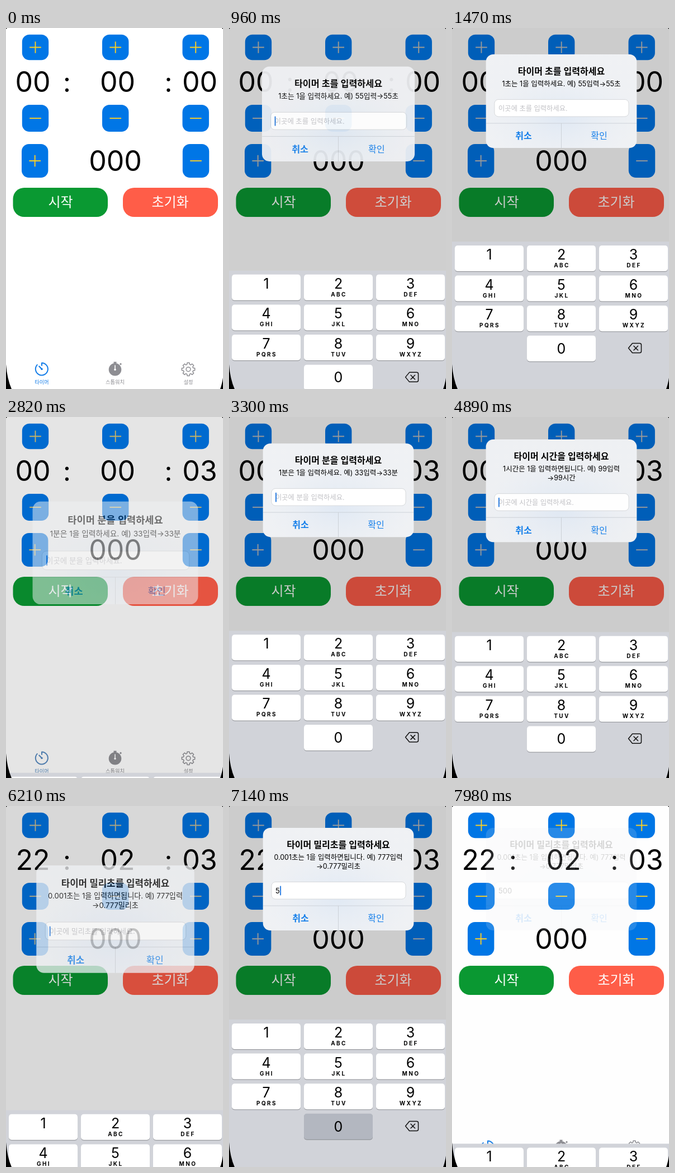
Write an HTML page that moves like this. It is 388 px wide and 644 px high and loops after 8000 ms.

```html
<!DOCTYPE html>
<html lang="ko">
<head>
<meta charset="utf-8">
<title>Timer</title>
<style>
html, body { margin: 0; width: 100%; height: 100%; overflow: hidden; background: #fff; }
svg { display: block; width: 388px; height: 644px; }
text { font-family: Inter, "Noto Sans CJK KR", "Noto Sans CJK", sans-serif; white-space: pre; }
.mid { text-anchor: middle; }
</style>
</head>
<body>
<svg id="stage" viewBox="0 0 388 644" xmlns="http://www.w3.org/2000/svg"></svg>
<script>
const LOOP = 8000, OMEGA = 18.26 / 1000;
const KEYBOARD_TOP = 381, KEYBOARD_TRAVEL = 263, KEYBOARD_DELAY = 78;
const FIRST_SEEN = 60, CLOSE_TIME = 420, ALERT_CENTER = 130.5, ALERT_SHIFT = 116;

const dialogs = [
  { open: 718, close: 2190, caretOff: 1470, unit: '초를', lines: ['1초는 1을 입력하세요. 예) 55입력→55초'],
    keys: [['3', 1680, 1800]] },
  { open: 2727, close: 3930, caretOff: 3360, unit: '분을', lines: ['1분은 1을 입력하세요. 예) 33입력→33분'],
    keys: [['2', 3510, 3630]] },
  { open: 4450, close: 5610, caretOff: LOOP, unit: '시간을', lines: ['1시간은 1을 입력하면됩니다. 예) 99입력', '→99시간'],
    keys: [['2', 4980, 5070], ['2', 5160, 5280]] },
  { open: 6060, close: 7800, caretOff: LOOP, unit: '밀리초를', lines: ['0.001초는 1을 입력하면됩니다. 예) 777입력', '→0.777밀리초'],
    keys: [['5', 6780, 6870], ['0', 7140, 7200], ['0', 7260, 7350]] }
];

const text = (x, y, size, str, attrs = '') =>
  `<text x="${x}" y="${y}" font-size="${size}" ${attrs}>${str}</text>`;
const label = (x, y, size, str, attrs = '') => text(x, y, size, str, `class="mid" ${attrs}`);
const rect = (x, y, w, h, r, fill, attrs = '') =>
  `<rect x="${x}" y="${y}" width="${w}" height="${h}" rx="${r}" fill="${fill}" ${attrs}/>`;
const mix = (a, b, p) => `rgb(${a.map((v, i) => Math.round(v + (b[i] - v) * p))})`;

// Remaining distance of a critically damped spring, 1 to 0
const rest = ms => ms <= 0 ? 1 : (1 + OMEGA * ms) * Math.exp(-OMEGA * ms);

function stepButton(cx, cy, h, plus) {
  const arm = plus ? `M${cx} ${cy - 10.3}v20.6` : '';
  return rect(cx - 23.7, cy - h / 2, 47.4, h, 13, '#0076e6', 'stroke="none"') +
    `<path d="M${cx - 10.3} ${cy}h20.6${arm}" stroke-width="1.9" fill="none"/>`;
}

function gear(cx, cy) {
  let d = '';
  for (let i = 0; i < 8; i++) {
    [[-0.27, 9], [-0.17, 11.8], [0.17, 11.8], [0.27, 9]].forEach(([off, r]) => {
      const a = i * Math.PI / 4 + off;
      d += `${d ? 'L' : 'M'}${(cx + r * Math.sin(a)).toFixed(2)} ${(cy - r * Math.cos(a)).toFixed(2)}`;
    });
  }
  return `<g fill="none" stroke="#8e8e93" stroke-width="1.5" stroke-linejoin="round">
    <path d="${d}Z"/><circle cx="${cx}" cy="${cy}" r="3.9"/></g>`;
}

function screen() {
  const cols = [52.5, 195.7, 339.2];
  return `<g id="steps">
    ${cols.map(x => stepButton(x, 34.5, 45.5, true) + stepButton(x, 161, 48, false)).join('')}
    ${stepButton(51.7, 237, 60, true)}${stepButton(339.5, 237, 60, false)}</g>
    ${[48, 199.5, 346.5].map((x, i) => label(x, 113.7, 50, '00', `id="num${i}"`)).join('')}
    ${label(109, 113.7, 48, ':')}${label(290.5, 113.7, 48, ':')}
    ${label(195.5, 254.6, 50, '000')}
    ${rect(12.5, 285, 169.5, 52, 20, '#0a9932')}${rect(209, 285, 170, 52, 20, '#ff5d48')}
    ${label(97.5, 319.3, 24, '시작', 'fill="#fff" font-weight="300"')}
    ${label(293.5, 319.3, 24, '초기화', 'fill="#fff" font-weight="300"')}`;
}

function tabs() {
  return `<g id="tab"><path d="M64 602v-4.6a11 11 0 1 1 -8.2 3.5M64 608.5l-4.8-5" fill="none"
      stroke="currentColor" stroke-width="2" stroke-linecap="round" stroke-linejoin="round"/>
      <circle cx="64" cy="608.5" r="1.8" fill="currentColor"/>
      ${label(64, 634.5, 9, '타이머', 'fill="currentColor" font-weight="500"')}</g>
    <g fill="#8e8e93"><circle cx="195" cy="609.3" r="11.3"/>
      <path d="M192.5 595.5h5v3h-5zM203 599.5l2-1.9 2 2-2 2z"/>
      <path d="M195 602v7" stroke="#fff" stroke-width="1.6" stroke-linecap="round"/>
      <circle cx="195" cy="609.5" r="1.8" fill="#fff"/>
      ${label(195, 634.5, 9.2, '스톱워치')}${label(326, 634.5, 9.2, '설정')}</g>
    ${gear(326, 608.8)}`;
}

function alertBox(dialog, i) {
  const d = dialog.lines.length > 1 ? 8 : 0;
  const y = 47 - d, h = 167 + 2 * d, bar = 170 + d;
  const box = fill => rect(60.7, y, 269.6, h, 13, fill);
  return `<g id="alert${i}" display="none">
    ${box('#f1f2f4')}${box('url(#glow)')}
    ${label(195.5, 83 - d, 16, `타이머 ${dialog.unit} 입력하세요`, 'font-weight="600"')}
    ${dialog.lines.map((s, n) => label(195.5, 103.5 - d + n * 16, 12.5, s)).join('')}
    ${rect(76, 127.5 + d, 240, 30.5, 7, '#fff', 'stroke="#cfd1d4" stroke-width="0.8"')}
    ${text(83, 147.5 + d, 12.3, `이곳에 ${dialog.unit} 입력하세요.`, 'class="hint" fill="#c2c2c6"')}
    ${text(83, 147.7 + d, 13, '', 'class="typed"')}
    ${rect(83, 134.5 + d, 2, 17, 1, '#2f7fe0', 'class="caret"')}
    <path d="M61 ${bar}H330M195.5 ${bar}V${y + h}" stroke="#c6cbd1" stroke-width="0.8"/>
    <g fill="#157fea">${label(128, 198.3 + d, 16, '취소', 'font-weight="700"')}
    ${label(263, 198.3 + d, 16, '확인')}</g></g>`;
}

function keyboard() {
  const letters = ['', 'ABC', 'DEF', 'GHI', 'JKL', 'MNO', 'PQRS', 'TUV', 'WXYZ'];
  const key = (name, sub, col, row) => {
    const x = 5 + col * 129, y = 388 + row * 53.6, cx = x + 61.5;
    return rect(x, y + 1, 123, 46, 5, '#8b8d92') + rect(x, y, 123, 46, 5, '#fff', `id="key${name}"`) +
      label(cx, y + (name === '0' ? 31.8 : 25), 25, name) +
      label(cx + 1, y + 39, 10, sub, 'font-weight="700" letter-spacing="2.4"');
  };
  return `<g id="keyboard">${rect(0, KEYBOARD_TOP, 388, 270, 0, '#d1d3d9')}
    ${letters.map((s, i) => key(String(i + 1), s, i % 3, Math.floor(i / 3))).join('')}
    ${key('0', '', 1, 3)}
    <path d="M322.5 562.5h13q3 0 3 3v11q0 3-3 3h-13l-7-8.5zM325 567.3l7.5 7.5M332.5 567.3l-7.5 7.5"
      fill="none" stroke="#111" stroke-width="1.5" stroke-linejoin="round" stroke-linecap="round"/></g>`;
}

const stage = document.getElementById('stage');
stage.innerHTML = `<defs><radialGradient id="glow" cx="0.5" cy="0.68" r="0.5">
    <stop offset="0" stop-color="#9cc4f4" stop-opacity="0.2"/>
    <stop offset="1" stop-color="#c4dcf8" stop-opacity="0.04"/></radialGradient></defs>
  ${rect(0, 0, 388, 644, 0, '#fff')}${screen()}${tabs()}
  ${rect(0, 0, 388, 644, 0, '#000', 'id="dim"')}
  ${dialogs.map(alertBox).join('')}${keyboard()}
  <path d="M0 600Q2 626 10 644H0ZM388 624Q386 636 383 644H388ZM0 0H2L0 2ZM388 0H386L388 2Z"/>`;

const $ = id => document.getElementById(id);
const alerts = dialogs.map((_, i) => {
  const el = $('alert' + i);
  return { el, hint: el.querySelector('.hint'), typed: el.querySelector('.typed'), caret: el.querySelector('.caret') };
});

function setAlert(dialog, parts, t, p, lift) {
  const opening = t < dialog.close;
  const scale = opening ? 1.2 - 0.2 * p : 1;
  const dy = opening ? ALERT_SHIFT * lift : 0;
  const typed = dialog.keys.filter(k => t >= k[2] - 30).map(k => k[0]).join('');
  parts.el.setAttribute('opacity', p);
  parts.el.setAttribute('transform',
    `translate(195.5 ${ALERT_CENTER + dy}) scale(${scale}) translate(-195.5 ${-ALERT_CENTER})`);
  parts.typed.textContent = typed;
  parts.hint.setAttribute('display', typed ? 'none' : 'inline');
  const caretOn = opening && (typed || t < dialog.caretOff);
  parts.caret.setAttribute('display', caretOn ? 'inline' : 'none');
  parts.caret.setAttribute('x', 83 + typed.length * 8.1);
}

function render(t) {
  let shade = 0, drop = 1;
  const pressed = new Set();
  dialogs.forEach((dialog, i) => {
    const on = t >= dialog.open + FIRST_SEEN && t < dialog.close + CLOSE_TIME;
    alerts[i].el.setAttribute('display', on ? 'inline' : 'none');
    if (!on) return;
    const shown = 1 - rest(t - dialog.open);
    const fade = rest(t - dialog.close);
    const lift = rest(t - dialog.open - KEYBOARD_DELAY);
    shade = shown * fade * fade; // the backdrop clears ahead of the alert
    drop = 1 - (1 - lift) * fade;
    setAlert(dialog, alerts[i], t, shown * fade, lift);
    dialog.keys.forEach(([name, from, to]) => { if (t >= from && t < to) pressed.add(name); });
  });

  $('dim').setAttribute('opacity', 0.2 * shade);
  $('steps').setAttribute('stroke', mix([250, 207, 36], [188, 190, 192], shade));
  $('tab').setAttribute('color', mix([18, 124, 232], [150, 150, 152], shade));
  $('keyboard').setAttribute('transform', `translate(0 ${KEYBOARD_TRAVEL * drop})`);
  $('keyboard').setAttribute('display', drop < 0.999 ? 'inline' : 'none');
  for (let n = 0; n < 10; n++) $('key' + n).setAttribute('fill', pressed.has(String(n)) ? '#b3b7c0' : '#fff');

  ['22', '02', '03'].forEach((value, i) => {
    $('num' + i).textContent = t >= dialogs[2 - i].close + CLOSE_TIME ? value : '00';
  });
}

const start = performance.now();
function tick() {
  render((performance.now() - start) % LOOP);
  requestAnimationFrame(tick);
}
tick();
</script>
</body>
</html>
```
